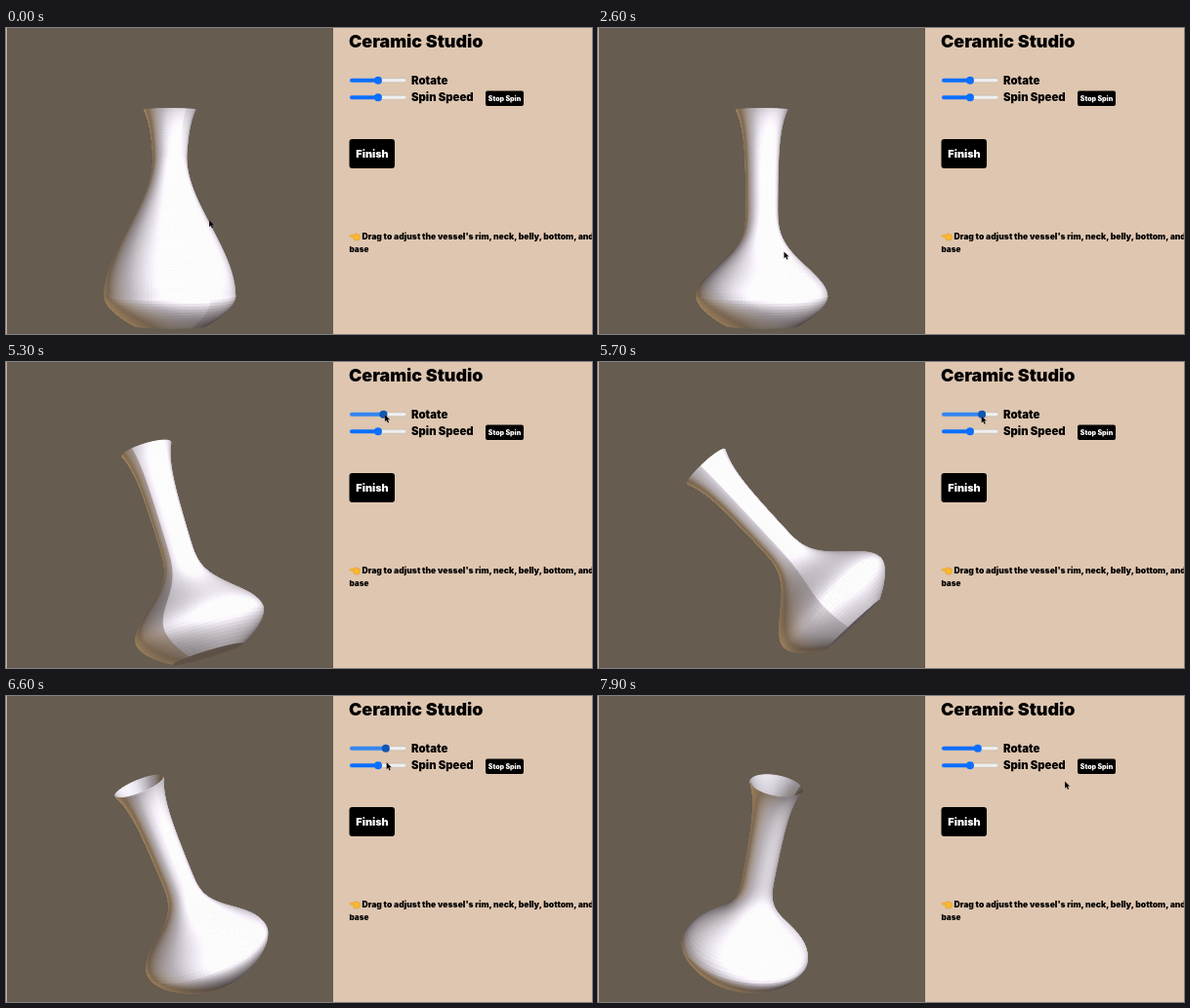
Recreate the animation shown at these times as an HTML page with a canvas. Size 600x314 px, loop 8000 ms.

```html
<!DOCTYPE html>
<html lang="en">
<head>
<meta charset="utf-8">
<title>Ceramic Studio</title>
<style>
html, body { margin: 0; width: 100%; height: 100%; overflow: hidden; background: #dec6b0; }
canvas, svg { position: absolute; left: 0; top: 0; }
text { font-family: Inter, "Open Sans", sans-serif; font-weight: 900; }
</style>
</head>
<body>
<canvas id="stage" width="600" height="314"></canvas>
<svg width="600" height="314" viewBox="0 0 600 314">
  <defs>
    <rect id="track" x="352" y="51.7" width="58" height="4" rx="2" fill="#efefef" stroke="#b9aea5" stroke-width=".5"/>
  </defs>
  <text x="351" y="20" font-size="17.9">Ceramic Studio</text>
  <use href="#track"/>
  <rect id="fill" x="352" y="51.7" width="29" height="4" rx="2"/>
  <circle id="thumb" cx="381" cy="53.7" r="4"/>
  <use href="#track" y="17.5"/>
  <g fill="#0d6efd">
    <rect x="352" y="69.2" width="29" height="4" rx="2"/>
    <circle cx="381" cy="71.2" r="4"/>
  </g>
  <text x="415" y="57.5" font-size="11.4">Rotate</text>
  <text x="415" y="75" font-size="11.3">Spin Speed</text>
  <rect x="491" y="64.5" width="39" height="15.5" rx="2"/>
  <text x="510.5" y="75" font-size="7" fill="#fff" text-anchor="middle">Stop Spin</text>
  <rect x="351.5" y="114" width="46.5" height="30" rx="3"/>
  <text x="375" y="133" font-size="10.9" fill="#fff" text-anchor="middle">Finish</text>
  <path d="M352 213.2q0-1 1.2-1h3.2l1-1.4q1.2-.4 1.2.8h2.4q1.2.2 1.2 1.4v3q0 1.6-1.6 1.8h-3.6q-1.4-.2-1.2-2l.2-1.6h-2.8q-1.2 0-1.2-1z" fill="#fbb829" stroke="#e08a1a" stroke-width=".4"/>
  <text x="364.5" y="217" font-size="8.6">Drag to adjust the vessel's rim, neck, belly, bottom, and</text>
  <text x="351.5" y="229.5" font-size="8.2">base</text>
  <path id="cursor" d="M0 0v7.2l1.7-1.5 1.2 2.7 1.3-.6-1.2-2.6h2.3z" stroke="#fff" stroke-opacity=".35" stroke-width=".4"/>
</svg>
<script>
const [stage, fill, thumb, cursor] = ['stage', 'fill', 'thumb', 'cursor'].map(id => document.getElementById(id));
const ctx = stage.getContext('2d');

const LOOP = 8, STEP = .1;                  // seconds
const CX = 167.8, CY = 169, DIST = 1600;    // pivot and camera distance
const TOP = 84, BELLY = 275, BASE = 305;
const ROWS = 74, SEGMENTS = 112;

const mix = (a, b, u) => a + (b - a) * u;
const smooth = u => (u = Math.max(0, Math.min(1, u)), u * u * (3 - 2 * u));
const ease = (t, from, to) => smooth((t - from) / (to - from));
const bump = (t, from, to) => t > from && t < to ? Math.sin(Math.PI * (t - from) / (to - from)) ** 2 : 0;

const shaping = t => 1 - Math.exp(-t);
const tilt = t => 28 * ease(t, 4.7, 5.9) + 18 * bump(t, 5, 6.6);   // degrees
const spin = t => 67 + 55 * (t - 7.1);

// flared rim, straight neck, then a belly whose shoulder drops as it is shaped
function radius(y, shape) {
  if (y > BELLY) return 67 - 30 * ((y - BELLY) / (BASE - BELLY)) ** 1.8;
  const start = mix(130, 182, shape);
  const swell = smooth((y - start) / (BELLY - start)) ** mix(1, 2.2, shape);
  return 15.8 + 10.5 * Math.exp((TOP - y) / 22) + 51 * swell;
}

function outline(shape) {
  const rows = [];
  for (let i = 0; i <= ROWS; i++) {
    const y = mix(TOP, BASE, i / ROWS);
    rows.push([y, radius(y, shape)]);
  }
  return [...rows, [BASE + .3, 18], [BASE + .3, 0]];
}

// cool key light from the upper right, warm light from behind on the lower left
function shade([x, y, z], inside) {
  const key = Math.max(0, .38 * x + .36 * y + .85 * z);
  const warm = Math.max(0, -.72 * x - .52 * y - .46 * z);
  const dim = inside ? .85 : 1;
  const rgb = [74 + 222 * key + 105 * warm, 67 + 224 * key + 78 * warm, 67 + 236 * key + 32 * warm];
  return `rgb(${rgb.map(c => Math.min(253, c * dim) | 0)})`;
}

function drawVase(t) {
  const lean = tilt(t) * Math.PI / 180, turned = spin(t) * Math.PI / 180;
  const cl = Math.cos(lean), sl = Math.sin(lean), cs = Math.cos(turned), ss = Math.sin(turned);
  const turn = (r, h, a) => {
    const x = r * Math.cos(a), z = r * Math.sin(a), side = x * cl - h * sl;
    return [side * cs + z * ss, x * sl + h * cl, z * cs - side * ss];
  };
  const project = ([x, y, z]) => {
    const s = DIST / (DIST - z);
    return [CX + x * s, CY - y * s];
  };
  const rows = outline(shaping(t));
  const angle = j => Math.PI * (.5 + 2 * j / SEGMENTS);
  const grid = rows.map(([y, r]) =>
    Array.from({ length: SEGMENTS + 1 }, (_, j) => turn(r, CY - y, angle(j))));
  const faces = [];
  for (let i = 0; i < rows.length - 1; i++) {
    const dy = rows[i + 1][0] - rows[i][0], dr = rows[i + 1][1] - rows[i][1], len = Math.hypot(dy, dr);
    const normal = a => turn(dy / len, dr / len, a);
    for (let j = 0; j < SEGMENTS; j++) {
      const quad = [grid[i][j], grid[i][j + 1], grid[i + 1][j + 1], grid[i + 1][j]];
      const a = angle(j + .5), n = normal(a), [x, y, z] = quad[0];
      const inside = n[2] * (DIST - z) - n[0] * x - n[1] * y < 0;
      if (inside && rows[i][0] > 160) continue;
      // normals fan out where the surface closes on itself
      const u = (j + .5) / SEGMENTS;
      const fan = .2 * (Math.max(0, 1 - u * 14) - Math.max(0, 1 - (1 - u) * 14));
      const lit = normal(a + fan);
      faces.push({
        depth: quad.reduce((sum, p) => sum + p[2], 0),
        color: shade(inside ? lit.map(v => -v) : lit, inside),
        quad: quad.map(project)
      });
    }
  }
  faces.sort((a, b) => a.depth - b.depth);
  ctx.lineWidth = .9;
  ctx.lineJoin = 'round';
  for (const { quad, color } of faces) {
    ctx.fillStyle = ctx.strokeStyle = color;
    ctx.beginPath();
    quad.forEach(p => ctx.lineTo(...p));
    ctx.closePath();
    ctx.fill();
    ctx.stroke();
  }
}

function drawSlider(t) {
  const x = 381 + tilt(t) * .28;
  const dragging = t >= 4.7 && t < 7.3, hover = t >= 4.3 && t < 4.7;
  fill.setAttribute('width', x - 352);
  fill.setAttribute('fill', dragging ? '#3485ee' : hover ? '#0f57b5' : '#0d6efd');
  thumb.setAttribute('cx', x);
  thumb.setAttribute('fill', dragging || hover ? '#0f57b5' : '#0d6efd');
}

function moveCursor(t) {
  const toSlider = ease(t, 3.6, 4.4), away = ease(t, 7.2, 7.9), shape = shaping(t);
  const x = mix(mix(208 - 19 * shape, 384 + tilt(t) * .2, toSlider), 478, away);
  const y = mix(mix(197 + 35 * shape, 54 + 19 * ease(t, 5.4, 7.2), toSlider), 87.5, away);
  cursor.setAttribute('transform', `translate(${x} ${y})`);
}

let shown = -1;
function frame() {
  const step = Math.floor(performance.now() / 1000 % LOOP / STEP);
  if (step !== shown) {
    shown = step;
    const t = step * STEP;
    ctx.fillStyle = '#dec6b0';
    ctx.fillRect(0, 0, 600, 314);
    ctx.fillStyle = '#665c50';
    ctx.fillRect(.8, 0, 334.2, 314);
    drawVase(t);
    drawSlider(t);
    moveCursor(t);
  }
  requestAnimationFrame(frame);
}
frame();
</script>
</body>
</html>
```
